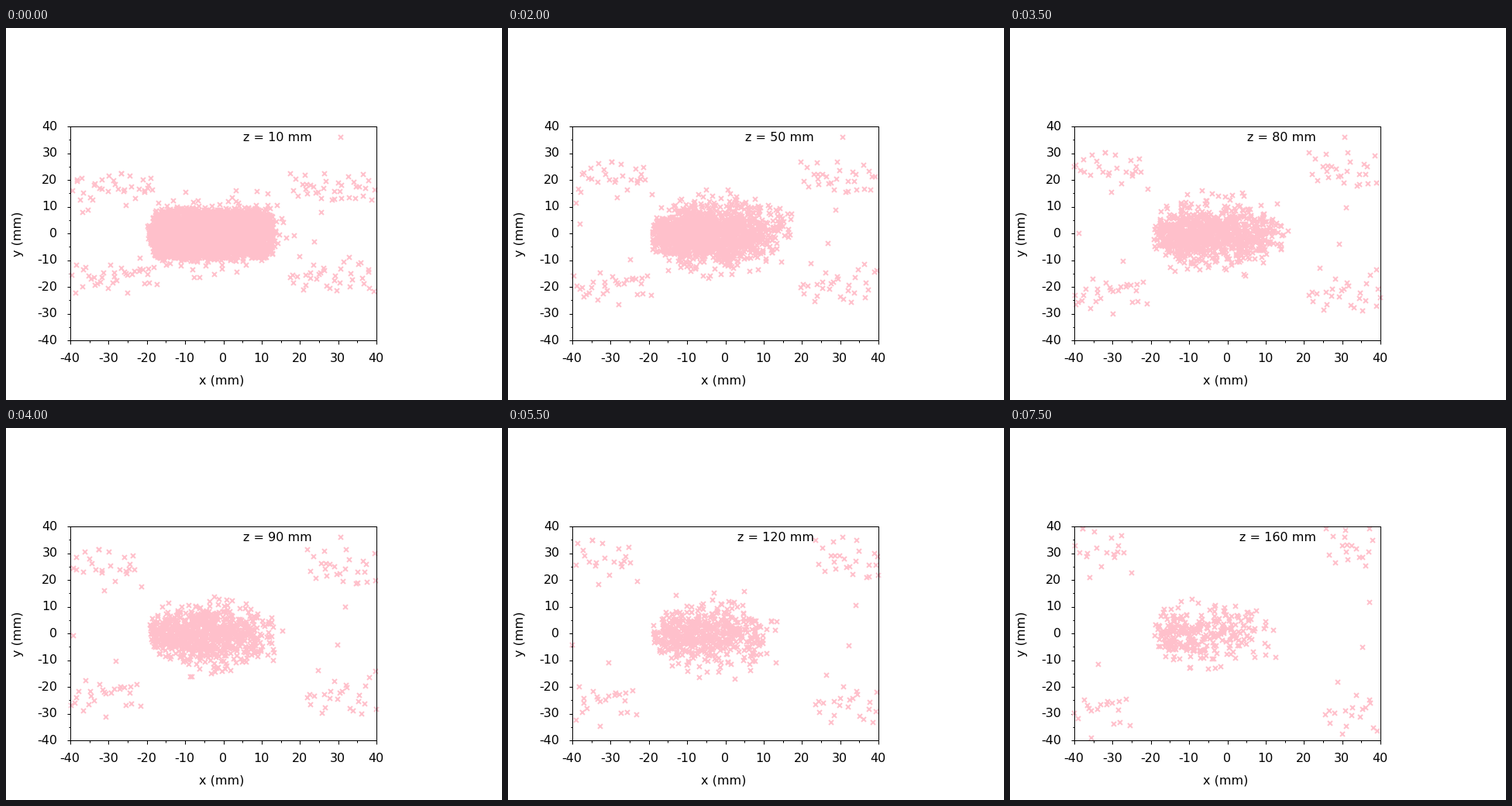
Write a matplotlib script that moves like this. It is 640 px wide and 480 px high and loops after 8 s.

```python
import numpy as np
import matplotlib.pyplot as plt
from matplotlib.animation import FuncAnimation
from matplotlib.ticker import MultipleLocator

W, H, DPI = 640, 480, 80
PT = 72 / DPI  # points per pixel
LEFT, TOP, RIGHT, BOTTOM = 83, 127, 478, 403
LIMIT = 40  # mm, both axes
SX, SY = (RIGHT - LEFT) / 80, (BOTTOM - TOP) / 80  # pixels per mm
X0, Y0 = (LEFT + RIGHT) / 2, (TOP + BOTTOM) / 2
Z_REF = 70  # mm, where the outer particles are laid out

plt.rcParams["font.family"] = "DejaVu Sans"
plt.rcParams["font.size"] = 16 * PT

# Lone particles: x, y at Z_REF, then drift in mm per mm of z
STRAYS = np.array([
    (-38.5, 1.2, -0.030, -0.110),
    (28.4, -4.0, 0.078, -0.013),
    (30.3, 9.3, 0.077, 0.025),
    (-26.5, -10.2, -0.080, -0.016),
])


def outer_particles():
    """Four diverging groups; the drift grows with distance from the axis."""
    rng = np.random.default_rng(4)
    rows = [STRAYS]
    for sx in (-1, 1):
        for sy in (-1, 1):
            x = np.linspace(20.8, 45, 36) + rng.normal(0, 0.5, 36)
            y = rng.normal(21.5, 4, 36).clip(12.5, 29)
            vx = 0.055 + 0.0018 * (x - 21)
            vy = 0.092 + 0.003 * (y - 22)
            rows.append(np.column_stack([sx * x, sy * y, sx * vx, sy * vy]))
    p = np.vstack(rows)
    return p[:, :2], p[:, 2:]


def core(z):
    """Central cloud, decaying with z and flat-topped near the entrance."""
    rng = np.random.default_rng(1000 + z)
    n = int(300 * np.exp((160 - z) / 65))
    reach = 39 - (z - 10) / 30
    x = -19.3 + reach * rng.beta(1.7, 2.6, n)
    envelope = (1 - (x / 20) ** 2) ** 0.25
    y = 5.4 * envelope * rng.normal(size=n).clip(-3.1, 3.1) - 0.3

    flat = rng.random(n) < 0.75 * max(0, 1 - (z - 10) / 20)
    m = flat.sum()
    u = rng.uniform(-1, 1, m)
    y[flat] = 8.5 * u - 0.3 + rng.normal(0, 0.9, m)
    x[flat] = -2.9 + (16.5 - 2.2 * u ** 2) * rng.uniform(-1, 1, m)
    x[flat] += rng.normal(0, 0.5, m).clip(-0.6, 2)
    return np.column_stack([x, y])


def label(x, y, s, **kw):
    kw = {"ha": "center", "va": "baseline", **kw}
    return fig.text(x / W, 1 - y / H, s, **kw)


fig = plt.figure(figsize=(W / DPI, H / DPI), dpi=DPI, facecolor="white")
ax = fig.add_axes([LEFT / W, 1 - BOTTOM / H,
                   (RIGHT - LEFT) / W, (BOTTOM - TOP) / H])
ax.set(xlim=(-LIMIT, LIMIT), ylim=(-LIMIT, LIMIT))
for axis in (ax.xaxis, ax.yaxis):
    axis.set_major_locator(MultipleLocator(10))
    axis.set_minor_locator(MultipleLocator(5))
ax.tick_params(which="major", length=4.5 * PT, width=PT,
               labelbottom=False, labelleft=False)
ax.tick_params(which="minor", length=2.5 * PT, width=PT)
for spine in ax.spines.values():
    spine.set_linewidth(PT)

for v in range(-LIMIT, LIMIT + 1, 10):
    label(X0 + v * SX - 0.4, 431, str(v))
    label(66.5, Y0 - v * SY + 4.7, str(v), ha="right")
label(278, 459, "x (mm)")
label(23.5, 265.5, "y (mm)", ha="right", va="center", rotation=90)
title = label(394.5, 146, "", ha="right")

style = dict(ls="none", marker="x", ms=6 * PT, mew=2 * PT, color="#ffc0cb",
             clip_on=False)
cloud, = ax.plot([], [], **style)
ax.plot([(432.3 - X0) / SX], [(Y0 - 141.3) / SY], **style)

START, DRIFT = outer_particles()


def draw(i):
    z = 10 * (i + 1)
    p = np.vstack([START + DRIFT * (z - Z_REF), core(z)])
    p = p[(np.abs(p) <= LIMIT).all(axis=1)]
    cloud.set_data(p[:, 0], p[:, 1])
    title.set_text(f"z = {z} mm")
    return cloud, title


anim = FuncAnimation(fig, draw, frames=16, interval=500, repeat=True,
                     repeat_delay=0)
plt.show()
```
